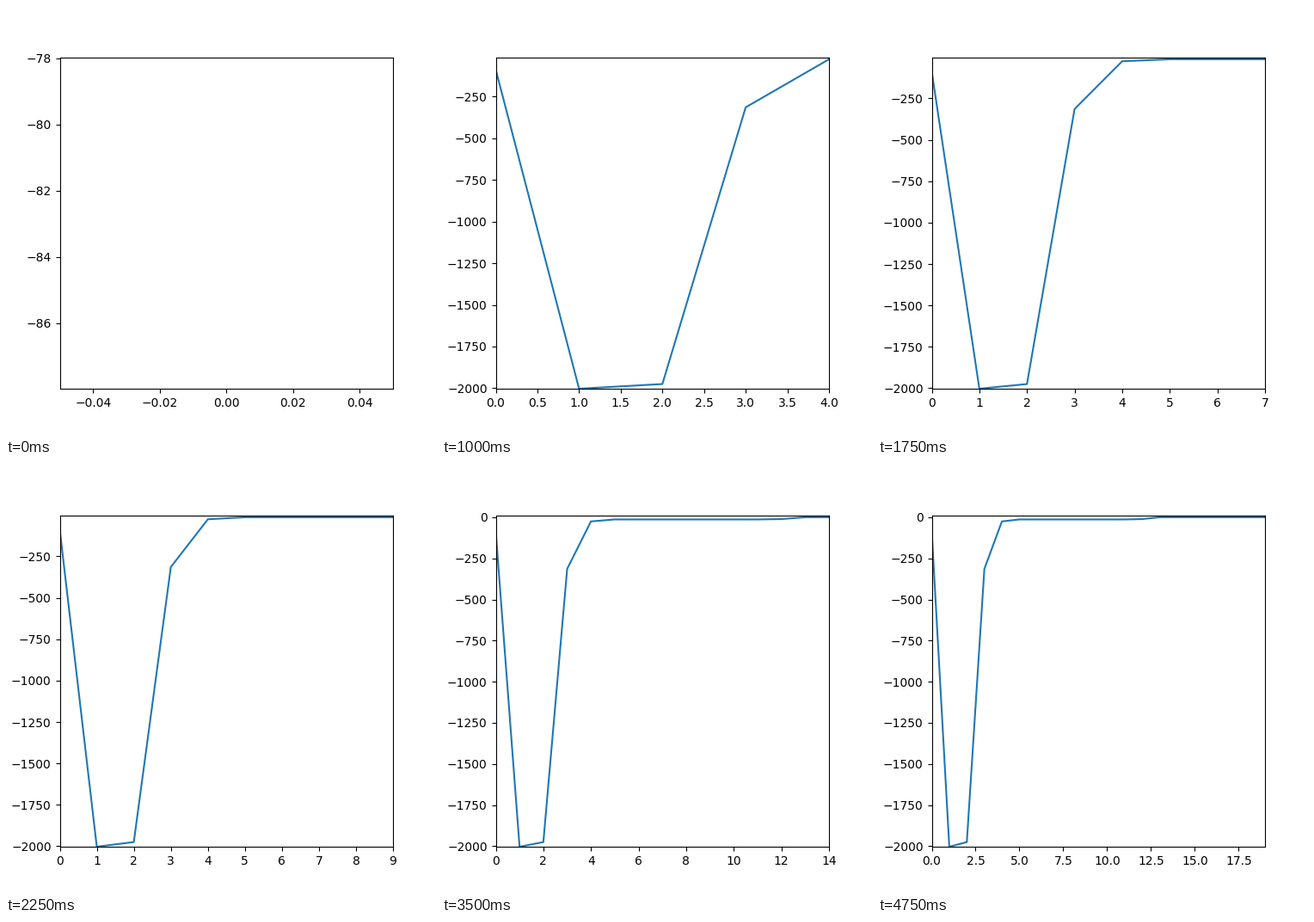
A matplotlib script that plays this animation: 500x500 px, repeating every 5 s.

```python
import matplotlib.pyplot as plt
from matplotlib.animation import FuncAnimation

FRAMES = 20
STEP_MS = 250

# Score per step: a deep drop, a quick recovery, then two plateaus.
scores = [-87.98, -2003, -1975, -314, -25.5] + [-13.4] * 7 + [-11.2]
scores += [-0.1] * (FRAMES - len(scores))

fig, ax = plt.subplots(figsize=(5, 5), dpi=100)
line, = ax.plot([], [], color="tab:blue", linewidth=1.5)


def axis_limits(last):
    """Limits for steps 0..last; a single step gets a narrow window."""
    seen = scores[:last + 1]
    x_lim = (0, last) if last else (-0.05, 0.05)
    return x_lim, (min(seen), max(seen) + 10)


def update(last):
    line.set_data(range(last + 1), scores[:last + 1])
    x_lim, y_lim = axis_limits(last)
    ax.set_xlim(x_lim)
    ax.set_ylim(y_lim)
    return line,


anim = FuncAnimation(fig, update, frames=FRAMES, interval=STEP_MS,
                     init_func=lambda: update(0), repeat=True, repeat_delay=0)
plt.show()
```
